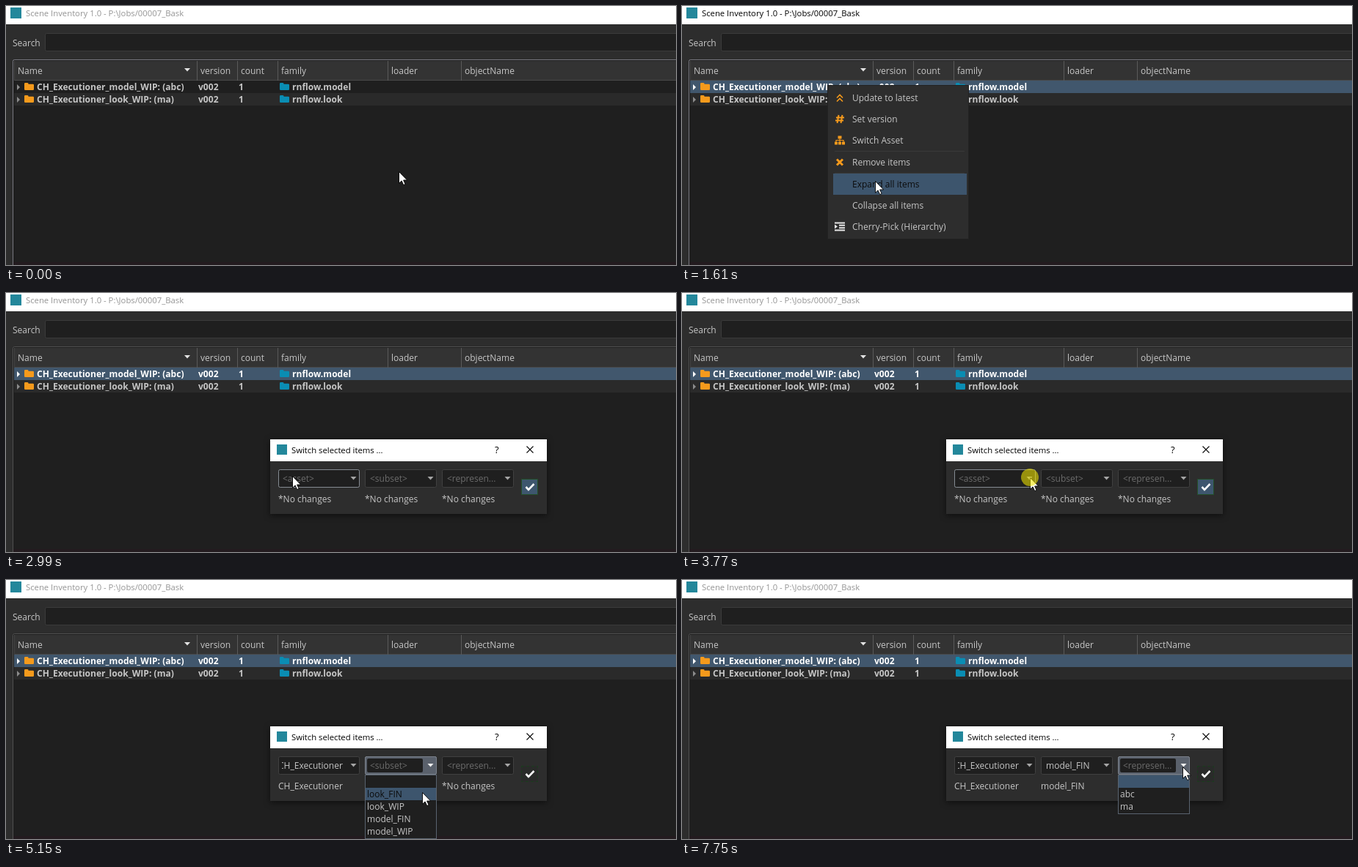
These frames come from a looping animation (913x354 px, 8000 ms). An HTML page:

```html
<!DOCTYPE html>
<html lang="en">
<head>
<meta charset="utf-8">
<title>Scene Inventory</title>
<style>
  html, body { margin: 0; width: 100%; height: 100%; overflow: hidden; background: #2d2d2d; }
  #stage { display: block; width: 913px; height: 354px; }
  text { font: 12px "Open Sans", "Noto Sans", sans-serif; fill: #c6c6c6; white-space: pre; }
  .bold text { font-weight: 700; letter-spacing: .04px; }
  .selected text { fill: #fff; }
  text.caption { font-size: 11.3px; fill: #000; }
  text.idle { fill: #949494; }
  text.hint { fill: #6c6c6c; }
  .hot text { fill: #0c0c0c; }
  .hover { fill: #3d556d; visibility: hidden; }
  .hot .hover { visibility: visible; }
  .orange { fill: #f59a1c; }
  .blue { fill: #0a8db3; }
  .dark { fill: #1f1f1f; }
  .line { fill: none; stroke-width: 2; }
  #dialog { filter: drop-shadow(0 2px 4px rgba(0, 0, 0, .55)); }
</style>
</head>
<body>
<svg id="stage" viewBox="0 0 913 354">
  <defs>
    <path id="folder" d="M0 1.3Q0 0 1.3 0H4.3Q5.6 0 5.6 1.8H11.7Q13 1.8 13 3.1V8.8Q13 10 11.7 10H1.3Q0 10 0 8.8Z"/>
    <path id="down" d="M-4 -2H4L0 2.5Z"/>
    <path id="branch" d="M0 -4L4 0L0 4Z"/>
  </defs>

  <rect width="913" height="354" fill="#2d2d2d"/>
  <rect width="913" height="25" fill="#fff"/>
  <rect x="6" y="2" width="15" height="15" fill="#23879b"/>
  <g id="title"></g>

  <text x="9" y="55">Search</text>
  <rect x="53.5" y="37.5" width="870" height="24" rx="2" fill="#1f1f1f" stroke="#3b3b3b"/>

  <rect x="9.5" y="73.5" width="920" height="300" rx="2" fill="#1f1f1f" stroke="#505050"/>
  <g data-on="0-2910"><rect x="9.5" y="73.5" width="920" height="300" rx="2" fill="none" stroke="#77777f"/></g>
  <rect x="11" y="75" width="902" height="27" fill="#333"/>
  <path d="M11 101.5H913M11.5 75V102" stroke="#484848"/>
  <g id="header"></g>
  <use href="#down" x="247" y="87" fill="#e4e4e4"/>
  <rect x="11" y="119" width="902" height="17" fill="#2a2a2a"/>
  <g id="rows" class="bold"></g>
  <rect x="10" y="350" width="903" height="4" fill="#231b1f"/>

  <g id="menu" data-on="745-2400"></g>

  <g data-on="2985-8000">
    <g id="dialog">
      <rect x="360" y="200" width="377" height="102" fill="#2d2d2d"/>
      <rect x="360" y="200" width="377" height="30" fill="#fff"/>
    </g>
    <rect x="369" y="207" width="14" height="14" fill="#23879b"/>
    <text class="caption" x="389" y="219">Switch selected items ...</text>
    <text class="caption" x="666" y="219" style="font-size:13px">?</text>
    <path d="M709.5 209.5L718.5 218.5M718.5 209.5L709.5 218.5" stroke="#111" stroke-width="1.2"/>
    <g id="fields"></g>
    <rect x="702.5" y="254.5" width="22" height="21" fill="#292b29" stroke="#17401a" stroke-dasharray="3 4"/>
    <g data-on="2985-3850"><rect x="702.5" y="254.5" width="22" height="21" fill="#3e566e" stroke="#235029"/></g>
    <path class="line" d="M708.5 265L712 268.8L719.5 261" stroke="#fff" style="stroke-width:2.6"/>
  </g>
  <g id="popups"></g>

  <path id="cursor" d="M.5 .5V16.3L4.1 12.9L6.7 18.6L9.1 17.5L6.6 12H11.6Z" fill="#fff" stroke="#000" stroke-width=".9"/>
  <g data-on="2220-2400 3770-3920 4230-4380 4765-4920 6160-6305 7425-7580">
    <circle id="glow" r="12" fill="#f0e400" fill-opacity=".58"/>
  </g>
</svg>

<script>
const LOOP = 8000;
const $ = id => document.getElementById(id);
const on = (ranges, body) => `<g data-on="${ranges}">${body}</g>`;
const label = (x, y, s, cls = '') => `<text x="${x}" y="${y}" class="${cls}">${s}</text>`;
const rect = (x, y, w, h, attrs) => `<rect x="${x}" y="${y}" width="${w}" height="${h}" ${attrs}/>`;
const use = (id, x, y, attrs) => `<use href="#${id}" x="${x}" y="${y}" ${attrs}/>`;

// Main window
const caption = 'Scene Inventory 1.0 - P:\\Jobs/00007_Bask';
$('title').innerHTML =
  on('0-670 2910-8000', label(27, 14, caption, 'caption idle')) +
  on('670-2910', label(27, 14, caption, 'caption'));

const columns = { Name: 11, version: 260, count: 315, family: 370, loader: 520, objectName: 620 };
$('header').innerHTML = Object.entries(columns).map(([name, x]) =>
  (x > 11 ? rect(x, 75, 1, 27, 'fill="#5a5a5a"') : '') + label(x + 5, 93, name)).join('');

const row = (y, name, family, tint) =>
  use('branch', 15, y, `fill="${tint}"`) + use('folder', 25, y - 6, 'class="orange"') +
  label(42, y + 4, name) + label(262, y + 4, 'v002') + label(317, y + 4, '1') +
  use('folder', 373, y - 6, 'class="blue"') + label(390, y + 4, family);
const model = ['CH_Executioner_model_WIP: (abc)', 'rnflow.model'];
$('rows').innerHTML =
  on('0-670', row(111, ...model, '#8c8c8c')) +
  on('670-8000', rect(11, 102, 902, 17, 'fill="#41576d"') + `<g class="selected">${row(111, ...model, '#fff')}</g>`) +
  row(128, 'CH_Executioner_look_WIP: (ma)', 'rnflow.look', '#8c8c8c');

// Context menu: top edge, label, icon centred on its row
const orange = 'class="line" stroke="#f59a1c"';
const items = [
  [111, 'Update to latest', `<path ${orange} style="stroke-width:1.6" d="M-4 0L0 -4L4 0M-4 5L0 1L4 5"/>`],
  [140, 'Set version', `<path ${orange} d="M-1.5 -5.5L-3.5 5.5M3.5 -5.5L1.5 5.5M-5 -2H6M-6 2H5"/>`],
  [169, 'Switch Asset', `<path class="orange" d="M-2.5 -6H2.5V-2H-2.5ZM-7 2H-3V6H-7ZM-2 2H2V6H-2ZM3 2H7V6H3Z"/>
    <path ${orange} style="stroke-width:1.2" d="M0 -2V2M-5 2V0H5V2"/>`],
  [199, 'Remove items', `<path ${orange} style="stroke-width:3" d="M-4 -4L4 4M4 -4L-4 4"/>`],
  [229, 'Expand all items', ''],
  [258, 'Collapse all items', ''],
  [287, 'Cherry-Pick (Hierarchy)', `<path class="line" stroke="#e6e6e6" d="M-7 -5H7M-1 -1.7H7M-1 1.7H7M-7 5H7"/>
    <path fill="#e6e6e6" d="M-7 -3L-3 0L-7 3Z"/>`]
];
$('menu').innerHTML =
  rect(198.5, 108.5, 192, 210, 'fill="#2d2d2d" stroke="#222"') +
  '<path d="M208 198.5H385M208 228.5H385" stroke="#393939"/>' +
  items.map(([y, name, icon]) =>
    `<g data-top="${y}" data-h="29">${rect(206, y, 182, 29, 'class="hover"')}` +
    `<g transform="translate(215 ${y + 14.5})">${icon}</g>${label(232, y + 19, name)}</g>`).join('');

// Dialog fields
const combo = (x, w, focus, open) =>
  rect(x + .5, 241.5, w - 1, 24, 'rx="2" class="dark" stroke="#404040"') +
  use('down', x + w - 8.5, 253, 'fill="#a5a5a5"') +
  on(focus, rect(x + .5, 241.5, w - 1, 24, 'rx="2" fill="none" stroke="#858b92"')) +
  on(open, rect(x + .5, 241.5, w - 1, 24, 'rx="2" fill="#5a616c" stroke="#7b828c"') +
    rect(x + 3, 244, w - 22, 19, 'rx="2" class="dark"') +
    use('down', x + w - 8.5, 253, 'fill="#f0f0f0"'));
const caret = (x, ranges) => on(ranges, rect(x, 247, 1, 14, 'fill="#e0e0e0"'));
const none = '*No changes';
const asset = 'CH_Executioner';

$('fields').innerHTML =
  combo(371, 111, '2985-4765', '3850-4380') +
  on('2985-4380', label(377, 258, '&lt;asset&gt;', 'hint') + label(371, 286, none)) +
  on('4380-8000', `<svg x="376" y="241" width="84" height="25">${label(-5, 17, asset)}</svg>` + label(371, 286, asset)) +
  caret(460, '4380-4765') +
  combo(489, 98, '4765-7425', '4840-6380') +
  on('2985-6380', label(496, 258, '&lt;subset&gt;', 'hint') + label(489, 286, none)) +
  on('6380-8000', label(496, 258, 'model_FIN') + label(489, 286, 'model_FIN')) +
  caret(554, '6380-7425') +
  combo(594, 98, '7425-8000', '7505-8000') +
  label(601, 258, '&lt;represen...', 'hint') + label(594, 286, none);

const popup = (x, w, ranges, names) => on(ranges,
  rect(x + .5, 266.5, w - 1, names.length * 17 + 2, 'class="dark" style="stroke:#59636f"') +
  names.map((name, i) => `<g data-top="${267 + i * 17}" data-h="17">` +
    rect(x + 1, 267 + i * 17, w - 2, 17, 'class="hover"') +
    label(x + 3, 280 + i * 17, name) + '</g>').join(''));
$('popups').innerHTML =
  popup(371, 111, '3850-4380', ['', asset]) +
  popup(489, 98, '4840-6380', ['', 'look_FIN', 'look_WIP', 'model_FIN', 'model_WIP']) +
  popup(594, 98, '7505-8000', ['', 'abc', 'ma']);

// Bursts of pointer movement: start, end, number of steps
const bursts = [[70, 820, 11], [1200, 1360, 3], [1610, 1990, 6], [2220, 2760, 8],
  [2910, 3690, 11], [3770, 4080, 5], [4230, 5000, 11], [5060, 5380, 5],
  [5540, 5610, 2], [6160, 6160, 1], [6310, 7100, 11], [7190, 7750, 8]];
// Pointer path: time, x, y
const path = [[0, 535, 226], [600, 198, 108], [1120, 198, 108], [1360, 262, 243],
  [1540, 262, 243], [1990, 270, 185], [2400, 270, 185], [2760, 390, 250],
  [3100, 390, 250], [3690, 474, 252], [3850, 474, 252], [4080, 466, 295],
  [4380, 466, 295], [4615, 585, 256], [4692, 577, 248], [5000, 577, 248],
  [5140, 567, 290], [5380, 550, 320], [5460, 550, 320], [5610, 550, 323],
  [6310, 550, 323], [6547, 629, 300], [6626, 632, 298], [7021, 680, 239],
  [7110, 680, 239], [7425, 682, 255], [LOOP, 682, 255]];

function snap(t) {
  let at = 0;
  for (const [a, b, n] of bursts) {
    if (t < a) break;
    const step = (b - a) / (n - 1);
    at = t >= b ? b : a + Math.floor((t - a) / step) * step;
  }
  return at;
}

function pointer(t) {
  const i = path.findIndex(p => p[0] > t);
  const [t0, x0, y0] = path[i - 1], [t1, x1, y1] = path[i];
  const k = (t - t0) / (t1 - t0), e = k * k * (3 - 2 * k);
  return [Math.round(x0 + (x1 - x0) * e), Math.round(y0 + (y1 - y0) * e)];
}

const timed = [...document.querySelectorAll('[data-on]')].map(el =>
  [el, el.dataset.on.split(' ').map(r => r.split('-').map(Number))]);
const lists = [$('menu'), ...$('popups').children].map(list =>
  [...list.querySelectorAll('[data-top]')].map(el => [el, +el.dataset.top, +el.dataset.h]));

function draw(now) {
  const t = now % LOOP;
  const [x, y] = pointer(snap(t));
  for (const [el, ranges] of timed)
    el.style.display = ranges.some(([a, b]) => t >= a && t < b) ? '' : 'none';
  lists.forEach((rows, n) => {
    let hot = rows.findIndex(([, top, h]) => y >= top && y < top + h);
    if (n === 0 && x < 206) hot = -1;
    if (n > 0 && hot < 0) hot = 0;
    rows.forEach(([el], i) => el.classList.toggle('hot', i === hot));
  });
  $('cursor').setAttribute('transform', `translate(${x} ${y})`);
  $('glow').setAttribute('transform', `translate(${x} ${y})`);
}

function tick() {
  draw(performance.now());
  requestAnimationFrame(tick);
}
tick();
</script>
</body>
</html>
```
